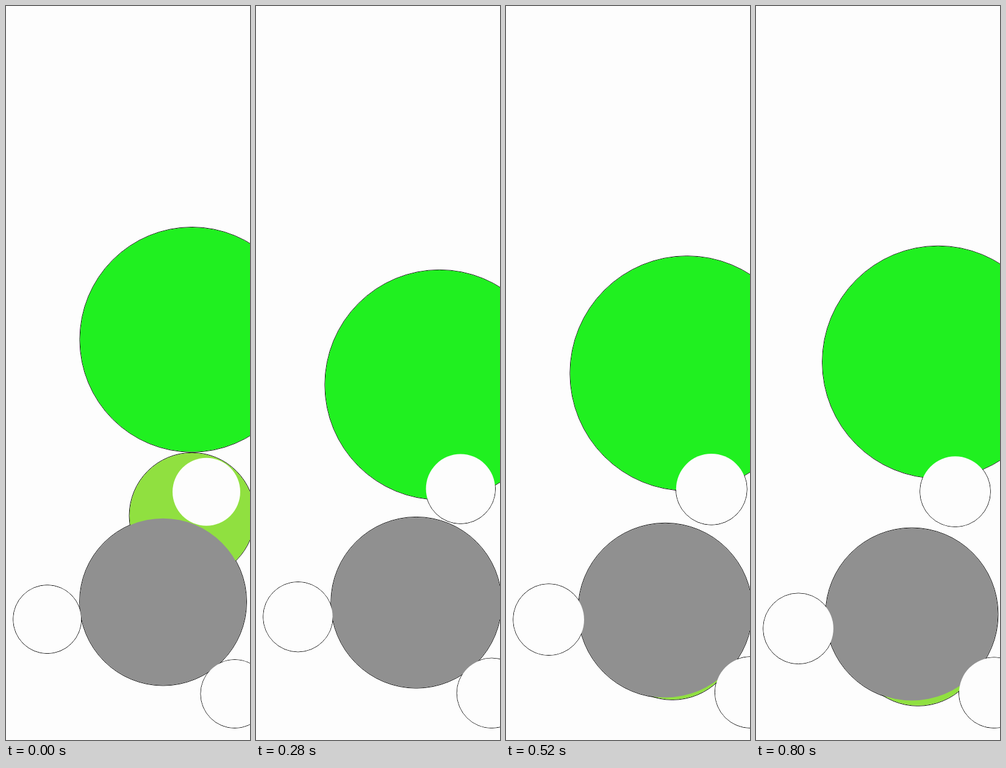
Recreate the animation shown at these times as an HTML page with a canvas. Size 400 by 1200 pixels, loop 840 ms.

```html
<!DOCTYPE html>
<html lang="en">
<head>
<meta charset="utf-8">
<title>Falling balls</title>
<style>
  html, body { margin: 0; width: 100%; height: 100%; overflow: hidden; background: #fdfdfd; }
  canvas { display: block; }
</style>
</head>
<body>
<canvas id="stage" width="400" height="1200"></canvas>
<script>
const ctx = document.getElementById('stage').getContext('2d');
const LOOP = 840, STEP = 40;
const LEFT = 11.7, FLOOR = 1181, VIEW_WIDTH = 477;
const PAPER = '#fdfdfd';
const GRAVITY = 0.0019;   // px per ms², already halved
const IMPACT = 280;       // the two falling balls meet the pile

// Smooth move by `amount` between two times.
function glide(t, amount, from, to) {
  const u = Math.min(Math.max((t - from) / (to - from), 0), 1);
  return amount * u * u * (3 - 2 * u);
}

// Exponential approach by `amount`, starting at `from`.
function settle(t, amount, from, tau) {
  return amount * (1 - Math.exp(-Math.max(t - from, 0) / tau));
}

const fall = (t, lift) => lift * t - GRAVITY * t * t;

// Free fall, then a critically damped rebound from the pile.
function bigHeight(t) {
  if (t < IMPACT) return 636 + fall(t, 0.227);
  const s = t - IMPACT;
  return 583 - (33 + 1.08 * s) * Math.exp(-s / 100);
}

function limeHeight(t) {
  return 348 + fall(Math.min(t, IMPACT), 0.07) - settle(t, 81, IMPACT, 115);
}

// World positions, back to front: x from the left edge, y up from the floor.
const balls = t => [
  { r: 184, fill: '#20f020',
    x: 293.3 - glide(t, 27.3, 180, 420) + settle(t, 12, 440, 85),
    y: bigHeight(t) },
  { r: 103, fill: '#90e040',
    x: 293.5 - settle(t, 50, 0, 260),
    y: limeHeight(t) },
  { r: 137, fill: '#909090',
    x: 246 - glide(t, 10, 240, 680),
    y: 207 - glide(t, 26.5, 120, 660) },
  { r: 56, fill: PAPER,
    x: 317 - glide(t, 12.5, 240, 860),
    y: 387 - glide(t, 12, 160, 500) },
  { r: 56, fill: PAPER,
    x: 56,
    y: 178.5 - glide(t, 8, 280, 440) - glide(t, 13.5, 600, 840) },
  { r: 56, fill: PAPER,
    x: 363.5 + glide(t, 9.5, 160, 460) - glide(t, 6.5, 520, 820),
    y: 56.5 }
];

function circle(x, y, r) {
  ctx.beginPath();
  ctx.arc(x, y, r, 0, 2 * Math.PI);
}

function draw(t) {
  const world = balls(t);
  // The camera keeps the pile's left edge and the big ball's right edge in view.
  const zoom = VIEW_WIDTH / (world[0].x + world[0].r);
  const placed = world.map(b => ({
    x: LEFT + zoom * b.x, y: FLOOR - zoom * b.y, r: zoom * b.r, fill: b.fill
  }));
  ctx.fillStyle = PAPER;
  ctx.fillRect(0, 0, 400, 1200);

  // All outlines lie beneath all fills.
  ctx.strokeStyle = '#000';
  ctx.lineWidth = 1;
  for (const b of placed) {
    circle(b.x, b.y, b.r);
    ctx.stroke();
  }
  for (const b of placed) {
    circle(b.x, b.y, b.r - 0.5);
    ctx.fillStyle = b.fill;
    ctx.fill();
  }
}

const start = performance.now();
function tick() {
  const t = (performance.now() - start) % LOOP;
  draw(Math.floor(t / STEP) * STEP);
  requestAnimationFrame(tick);
}
tick();
</script>
</body>
</html>
```
